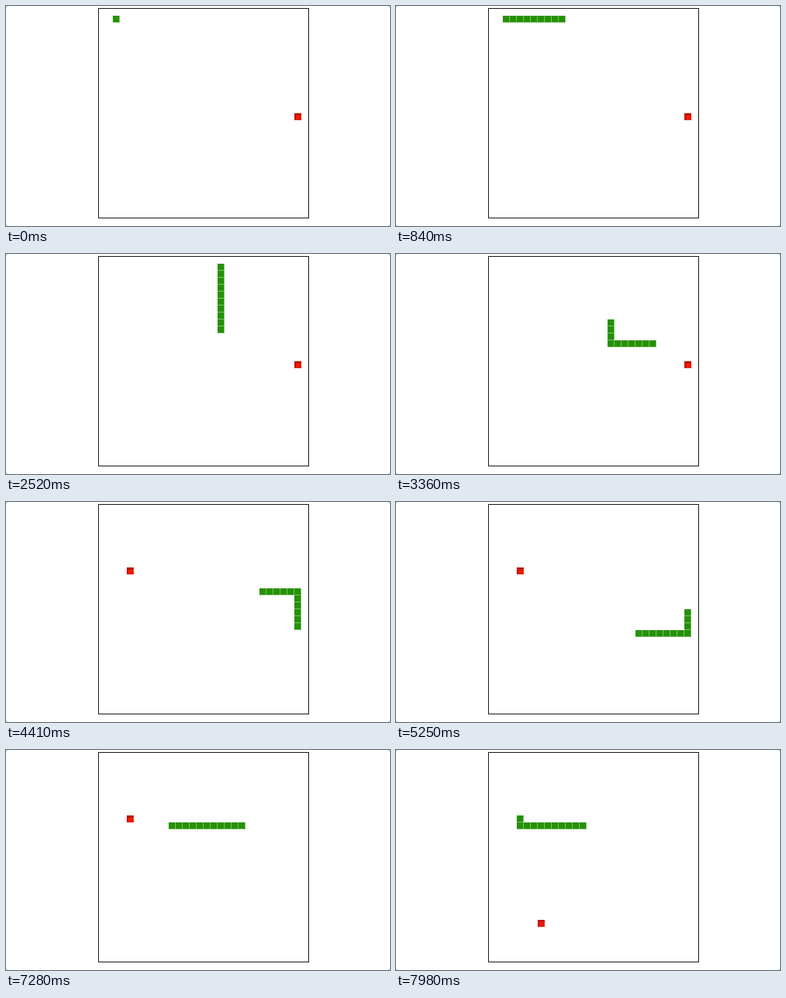
These frames come from a looping animation (550 by 316 pixels, 8000 ms). An HTML page:

```html
<!DOCTYPE html>
<html lang="en">
<head>
<meta charset="utf-8">
<title>Snake</title>
<style>
  html, body { margin: 0; width: 100%; height: 100%; overflow: hidden; background: #8a8a8a; }
  svg { display: block; width: 550px; height: 316px; }
</style>
</head>
<body>
<svg viewBox="0 0 550 316" shape-rendering="crispEdges">
  <defs>
    <g id="cell">
      <rect width="10" height="10" fill="#86c274"/>
      <rect width="9" height="9" fill="#259104"/>
    </g>
    <g id="apple">
      <rect width="10" height="10" fill="#bd1200"/>
      <rect x="2" y="3" width="8" height="7" fill="#ea1c04"/>
    </g>
  </defs>
  <rect width="550" height="316" rx="2.5" fill="#fff" shape-rendering="auto"/>
  <rect x="132.5" y="3.5" width="301" height="301" fill="none" stroke="#000"/>
  <g id="board" transform="translate(133 4)"></g>
</svg>
<script>
const LOOP = 8000;
const CELL = 10;
const START = [2, 1];
// Each leg: dx, dy, number of cells
const LEGS = [
  [1, 0, 15], [0, 1, 11], [1, 0, 11], [0, 1, 6],
  [-1, 0, 8], [0, -1, 8], [-1, 0, 16], [0, -1, 1]
];
// The apple's cell from a given step on
const APPLES = [
  { step: 0, at: [28, 15] },
  { step: 40, at: [4, 9] },
  { step: 76, at: [7, 24] }
];

const board = document.getElementById('board');

function addPiece(id) {
  const el = document.createElementNS('http://www.w3.org/2000/svg', 'use');
  el.setAttribute('href', '#' + id);
  board.appendChild(el);
  return el;
}

function place(el, [col, row]) {
  el.setAttribute('x', col * CELL);
  el.setAttribute('y', row * CELL);
}

function buildPath() {
  let [x, y] = START;
  const path = [[x, y]];
  for (const [dx, dy, count] of LEGS) {
    for (let i = 0; i < count; i++) path.push([x += dx, y += dy]);
  }
  return path;
}

// Steps last 140 and 70 ms in turn
function stepAt(ms) {
  const t = ms + 70;
  return 2 * Math.floor(t / 210) - (t % 210 < 70 ? 1 : 0);
}

const path = buildPath();
const apple = addPiece('apple');
const body = Array.from({ length: 11 }, () => addPiece('cell'));

function draw(ms) {
  const step = Math.min(stepAt(ms), path.length - 1);
  const size = Math.min(step + 1, step > 40 ? 11 : 10);
  body.forEach((el, i) => {
    const shown = i < size;
    el.setAttribute('visibility', shown ? 'visible' : 'hidden');
    if (shown) place(el, path[step - i]);
  });
  place(apple, APPLES.filter(a => a.step <= step).pop().at);
}

const begin = performance.now();
function tick() {
  draw((performance.now() - begin) % LOOP);
  requestAnimationFrame(tick);
}
tick();
</script>
</body>
</html>
```
